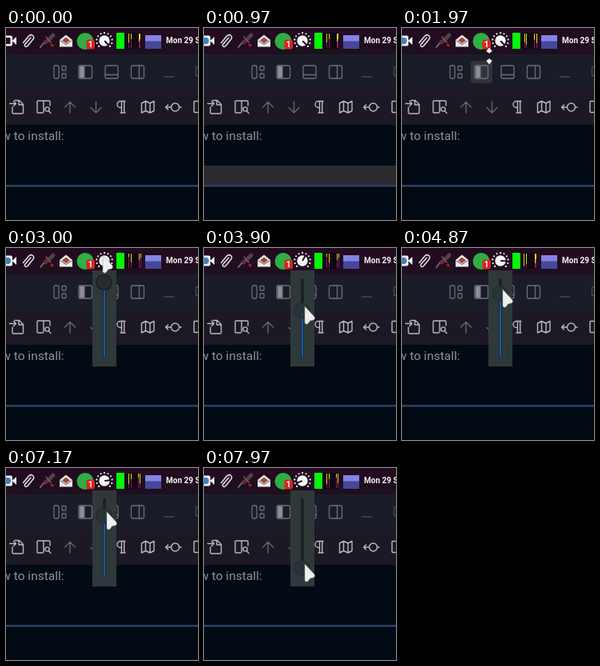
Recreate the animation shown at these times as an HTML page. Size 240x240 px, loop 8000 ms.

```html
<!DOCTYPE html>
<html lang="en">
<head>
<meta charset="utf-8">
<title>Brightness slider</title>
<style>
  html, body { margin: 0; width: 100%; height: 100%; overflow: hidden; background: #020b14; }
  svg { display: block; width: 100vw; height: 100vh; }
  .line { fill: none; stroke-linecap: round; stroke-linejoin: round; }
  text { font-family: Roboto, Inter, sans-serif; }
</style>
</head>
<body>
<svg viewBox="0 0 240 240">
  <defs>
    <linearGradient id="top" x2="0" y2="1">
      <stop offset="0" stop-color="#240a20"/><stop offset="1" stop-color="#1d101f"/>
    </linearGradient>
  </defs>

  <rect width="240" height="240" fill="#020b14"/>
  <rect width="240" height="34" fill="url(#top)"/>
  <rect y="33" width="240" height="45" fill="#1a1d28"/>
  <rect y="77" width="240" height="44" fill="#1c1925"/>
  <rect id="bar" y="172" width="240" height="24" fill="#2a2a2f"/>
  <rect y="196" width="240" height="2.5" fill="#2d4064"/>
  <text x="72.5" y="140" text-anchor="end" font-size="15.5" fill="#8f9396">how to install:</text>

  <!-- window controls -->
  <rect id="hover" x="86" y="41" width="27" height="28" rx="4" fill="#31323c"/>
  <g class="line" stroke="#6c6d76" stroke-width="1.3">
    <rect x="60" y="47" width="6" height="16" rx="1.5"/>
    <rect x="70" y="47.5" width="5" height="5.5" rx="1"/>
    <rect x="70" y="57" width="5" height="5.5" rx="1"/>
    <rect x="91" y="47" width="16.5" height="16" rx="2"/>
    <path d="M92 47.5h6v15h-6z" fill="#909097"/>
    <rect x="124" y="47" width="16" height="16" rx="2"/>
    <path d="M124 58.5h16"/>
    <rect x="156.500" y="47" width="16" height="16" rx="2"/>
    <path d="M166.500 47v16"/>
    <path d="M197.500 61h12M246 49h-8.500v10.500h8.500" stroke="#454751"/>
  </g>

  <!-- toolbar -->
  <g class="line" stroke="#b9b9be" stroke-width="1.4">
    <path d="M8 99v6.500q0 1.500 1.500 1.500h10.500q1.500 0 1.500-1.500v-10l-5-5h-5.500M16 90.500v5.500h5.500M4.500 94.500h8M9.500 91.500l3 3-3 3"/>
    <path d="M46 106h-6q-1 0-1-1v-13q0-1 1-1h14q1 0 1 1v5M47 91v14M53.500 104l2.500 2.500"/>
    <circle cx="51.500" cy="101.500" r="2.600"/>
    <path d="M80 106v-13M73.500 99l6.500-6.500 6.500 6.500M112.500 92v13M106 99.500l6.500 6.500 6.500-6.500" stroke="#666570"/>
    <path d="M149 91.500h-6a4 4 0 0 0 0 8h1.500M144.500 91.500v14.500M147.700 91.500v14.500M143 106h3M146.500 106h2.500"/>
    <path d="M169.500 94l5-2.500 5.500 2.500 5-2.500v12l-5 2.500-5.500-2.500-5 2.500zM174.500 91.500v12M180 94v12"/>
    <circle cx="211.500" cy="99" r="5"/>
    <path d="M206 99h-6M202.500 96l-3 3 3 3M216.500 99h2.500"/>
    <path d="M246 91.500h-10q-1 0-1 1v12q0 1 1 1h10"/>
  </g>

  <!-- tray -->
  <rect x="-4" y="9.500" width="12" height="13" rx="2" fill="#f1f1f1"/>
  <path d="M8 15.500l5-4.500v10l-5-4.500z" fill="#f1f1f1"/>
  <rect x="-3" y="12" width="8.500" height="8" rx="1" fill="#22101f" id="idle"/>
  <circle id="lens" cx="2" cy="16" r="4.200" fill="#3f7fc4"/>
  <path class="line" stroke="#e4e4e4" stroke-width="1.500" d="M31 12l-7 8q-1.500 2 0 3t3-.5l6.500-8q2.500-3 0-5t-5 .5l-7 8.500"/>
  <g class="line">
    <path d="M55 13l4-4" stroke="#4b454b" stroke-width="5"/>
    <path d="M49 18l4-3" stroke="#6b2a32" stroke-width="5"/>
    <path d="M47 19l-4 5" stroke="#75676c" stroke-width="2"/>
    <path d="M50 11l6 7" stroke="#6d5f65" stroke-width="1.500"/>
    <path d="M57 21l1 1" stroke="#b01c24" stroke-width="3"/>
  </g>
  <path d="M67 15l8-6.500 8 6.500v8.500h-16z" fill="#eceaea"/>
  <path d="M70 15.500l5-4 5 4-5 3.500z" fill="#9c443f"/>
  <path class="line" d="M68 16l7 4.500 7-4.500" stroke="#6a4a4a" stroke-width="1"/>
  <circle cx="99" cy="16.500" r="10.500" fill="#2fae43"/>
  <rect x="100.500" y="14.500" width="10.500" height="12" rx="3" fill="#dc2323"/>
  <text x="105.700" y="24.200" text-anchor="middle" font-size="10" font-weight="700" fill="#fff">1</text>

  <g id="ticks" fill="#f4f4f4"></g>
  <circle cx="123" cy="16" r="6.700" fill="#f7f7f7"/>
  <path id="dial" class="line" d="M123 15v-6" stroke="#22101f" stroke-width="2"/>

  <rect x="138" y="6" width="30.500" height="20" fill="#100711"/>
  <rect x="138" y="6" width="10" height="20" fill="#08f408"/>
  <g id="graph"></g>
  <rect x="174" y="9" width="20" height="17" fill="#474799"/>
  <rect x="174" y="9" width="20" height="7.500" fill="#8383e6"/>
  <text x="200" y="19" font-size="10" font-weight="700" fill="#f6f4f6">Mon 29 Sep</text>

  <!-- slider -->
  <g id="popup">
    <rect x="108" y="28" width="30" height="120" fill="#2f393a"/>
    <path class="line" d="M123 40v96" stroke="#1b2123" stroke-width="4"/>
    <path id="level" class="line" stroke="#1d55a0" stroke-width="2.400"/>
    <circle id="knob" cx="122.500" r="9.500" stroke-width="1.200"/>
  </g>

  <path id="arrow" d="M0-1L12 12q1.500 3-1.500 4l-4 1-2.500 3.500q-2.500 2-4-1z" fill="#eeefef" stroke="#8b9092" stroke-width=".5"/>
  <path id="resize" d="M0-11l4 5-4 3-4-3zM0 11l4-5-4-3-4 3z" fill="#f4f4f4" stroke="#25252c" stroke-width=".6"/>
</svg>

<script>
const LOOP = 8000;
const $ = id => document.getElementById(id);
const show = (id, on) => $(id).style.display = on ? '' : 'none';

// rows of [time, value, ...]
const pointer = [
  [1150, 246, 150], [1500, 175, 112], [1830, 113, 84], [1970, 109, 35],
  [2150, 113, 22], [2450, 121, 10], [3000, 121, 10], [3400, 126, 40]
];
const drag = [
  [3500, 43], [3900, 78], [4150, 89], [4320, 82], [4600, 65], [4870, 57],
  [5050, 53], [5200, 62], [5580, 121], [5750, 117], [6000, 99], [6300, 84],
  [6600, 64], [6900, 52], [7250, 62], [7630, 106], [7970, 125]
];

function sample(rows, t) {
  if (t <= rows[0][0]) return rows[0].slice(1);
  const i = rows.findIndex(r => r[0] > t);
  if (i < 0) return rows[rows.length - 1].slice(1);
  const a = rows[i - 1], b = rows[i];
  const p = (t - a[0]) / (b[0] - a[0]);
  return a.slice(1).map((v, k) => v + (b[k + 1] - v) * p);
}

const noise = n => {
  const v = Math.sin(n * 127.1 + 11.7) * 43758.5453;
  return v - Math.floor(v);
};

for (let i = 0; i < 11; i++) {
  const a = (-135 + i * 27) * Math.PI / 180;
  const dot = document.createElementNS('http://www.w3.org/2000/svg', 'circle');
  dot.setAttribute('cx', 123 + 9.8 * Math.sin(a));
  dot.setAttribute('cy', 16 - 9.8 * Math.cos(a));
  dot.setAttribute('r', 1.1);
  $('ticks').append(dot);
}

// sparse stripes, yellow over magenta
function drawGraph(step) {
  $('graph').innerHTML = [152, 155, 165, 167].map((base, i) => {
    const x = base + Math.floor(noise(step * 4 + i) * 2);
    const h = 3 + Math.round(noise(step + i * 9) * 12);
    return `<rect x="${x}" y="7" width="1" height="${h}" fill="#dede20"/>` +
           `<rect x="${x}" y="${7 + h}" width="1" height="${18 - h}" fill="#8a1868"/>`;
  }).join('');
}

let lastStep = -1;
function draw(t) {
  const dragging = t >= 3500;
  const y = sample(drag, t)[0];
  const [px, py] = dragging ? [126, y - 4] : sample(pointer, t);
  const resizing = t >= 1930 && t < 2030;

  $('bar').style.opacity = t < 1100 ? Math.min(1, Math.max(0, (t - 170) / 200)) : 0;
  show('idle', t < 170);
  show('lens', t >= 170);
  show('hover', t >= 1880 && t < 2060);
  show('popup', t >= 2670);
  show('arrow', t >= 1150 && !resizing);
  show('resize', resizing);

  const move = `translate(${px} ${py})`;
  $('arrow').setAttribute('transform', move);
  $('resize').setAttribute('transform', move);

  $('knob').setAttribute('cy', y);
  $('knob').setAttribute('fill', dragging ? '#2a3335' : '#282b2d');
  $('knob').setAttribute('stroke', dragging ? '#222d33' : '#15191b');
  $('level').setAttribute('d', `M123 ${y}V136`);
  const level = 1 - (y - 43) / 90;
  $('dial').setAttribute('transform', `rotate(${-135 + 270 * level} 123 16)`);

  const step = Math.floor(t / 1000);
  if (step !== lastStep) drawGraph(lastStep = step);
}

const start = performance.now();
function tick() {
  draw((performance.now() - start) % LOOP);
  requestAnimationFrame(tick);
}
tick();
</script>
</body>
</html>
```
